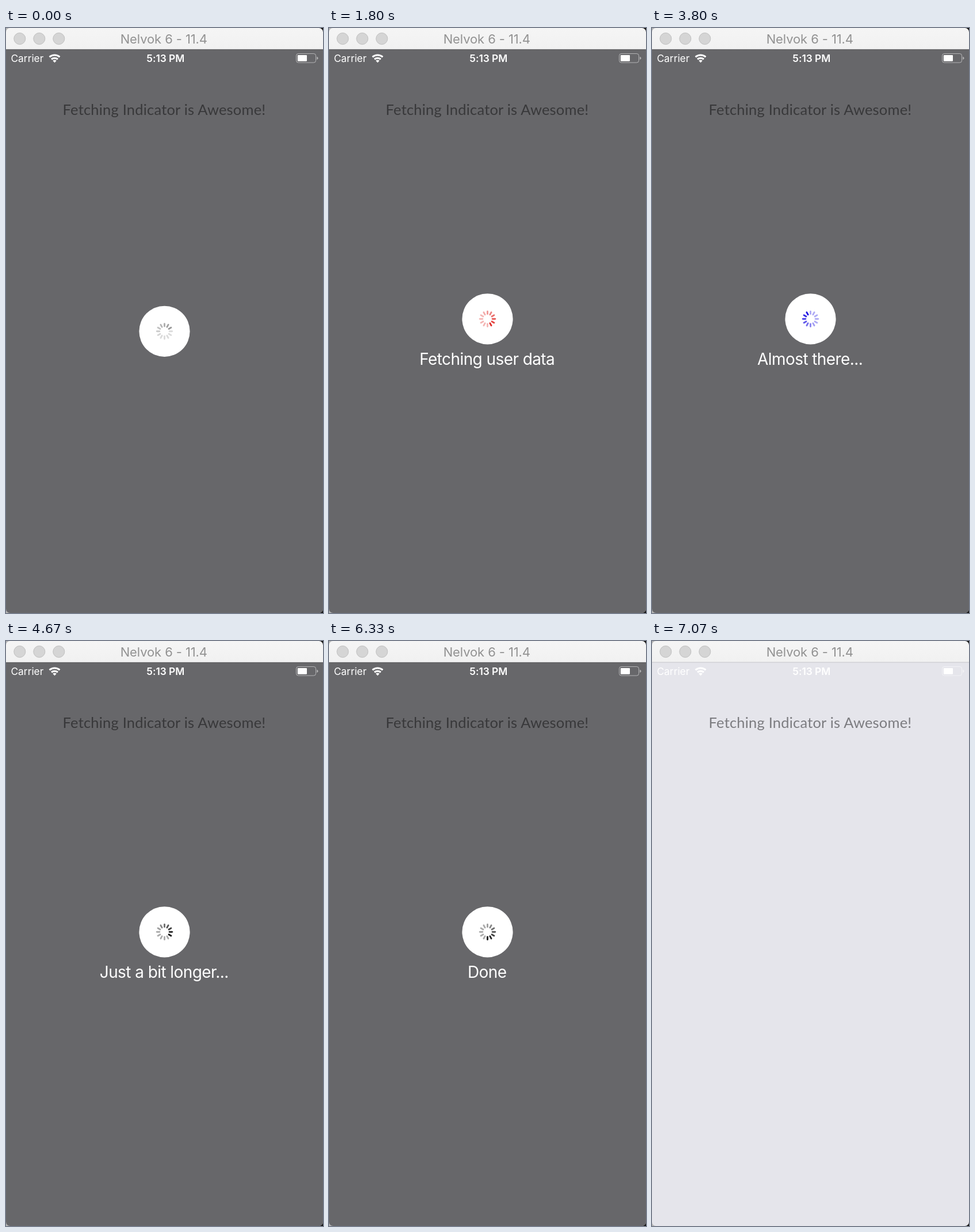
Animation of 551 by 1016 pixels, one loop 7740 ms. Source, as an HTML page:

```html
<!DOCTYPE html>
<html lang="en">
<head>
<meta charset="utf-8">
<title>Loading indicator</title>
<style>
  html, body { margin: 0; width: 100%; height: 100%; overflow: hidden; background: #fff; }
  svg { display: block; width: 551px; height: 1016px; }
  text { font-family: Inter, "Open Sans", sans-serif; }
  .mid { text-anchor: middle; }
  .bar { font-size: 22px; letter-spacing: -.1px; fill: #929292; }
  .head { font-family: Lato, sans-serif; font-size: 25.5px; letter-spacing: .2px; fill: #7c7c80; }
  .status { font-size: 17.4px; fill: #fff; }
  .bold { font-weight: 600; letter-spacing: -.05px; }
  .note { font-size: 28px; letter-spacing: -.58px; fill: #fff; }
</style>
</head>
<body>
<svg viewBox="0 0 551 1016">
  <defs>
    <clipPath id="win"><rect width="551" height="1016" rx="7"/></clipPath>
    <linearGradient id="chrome" x2="0" y2="1">
      <stop stop-color="#f5f5f5"/><stop offset="1" stop-color="#f1f1f1"/>
    </linearGradient>
  </defs>
  <rect width="275" height="1016" fill="#b5b5b5"/>
  <rect x="275" width="276" height="1016" fill="#111"/>
  <g clip-path="url(#win)">
    <rect width="551" height="37" fill="url(#chrome)"/>
    <g fill="#d5d5d5" stroke="#bfbfbf">
      <circle cx="23.8" cy="18.5" r="10"/>
      <circle cx="57.8" cy="18.5" r="10"/>
      <circle cx="91.8" cy="18.5" r="10"/>
    </g>
    <text class="bar mid" x="274.3" y="27">Nelvok 6 - 11.4</text>

    <rect y="37" width="551" height="979" fill="#e5e5eb"/>
    <rect y="36.5" width="551" height="1" fill="#c5c5c9"/>
    <text class="head mid" x="275" y="150.7">Fetching Indicator is Awesome!</text>
    <rect id="shade" y="37" width="551" height="979" fill="#000" opacity=".55"/>

    <text class="status" x="8.4" y="59">Carrier</text>
    <text class="status bold mid" x="277.3" y="59">5:13 PM</text>
    <g fill="none" stroke="#fff" stroke-width="3.1">
      <path d="M75.6 50.3a13.6 13.6 0 0 1 17.8 0"/>
      <path d="M79 54.3a8.5 8.5 0 0 1 11 0"/>
    </g>
    <path d="M84.5 60.2l-3.2-3.4a5 5 0 0 1 6.4 0z" fill="#fff"/>
    <rect x="504.5" y="44.5" width="34" height="15.6" rx="3.6" fill="none" stroke="#fff" stroke-opacity=".5"/>
    <path d="M540.2 49.8q2.4 .8 2.4 2.6t-2.4 2.6z" fill="#fff" fill-opacity=".5"/>
    <rect x="506.8" y="46.9" width="16.2" height="10.9" rx="1.2" fill="#fff"/>

    <g id="loader">
      <circle r="44.1" fill="#fff"/>
      <g id="blades" stroke-width="2.9" stroke-linecap="round"></g>
    </g>
    <text id="note" class="note mid" x="274.7" y="585"></text>
  </g>
</svg>
<script>
const LOOP = 7740, END = 7070, COUNT = 12, TURN = 1000;
const FADE = .1, REST = .35;
const stages = [
  { at: -450, color: "#999", y: 526.8, note: "" },
  { at: 1070, color: "#e2332f", y: 505.3, note: "Fetching user data" },
  { at: 2600, color: "#1d12e2", y: 505.3, note: "Almost there..." },
  { at: 4070, color: "#111", y: 505.3, note: "Just a bit longer..." },
  { at: 5530, color: "#111", y: 505.3, note: "Done" }
];

const byId = id => document.getElementById(id);
const shade = byId("shade"), loader = byId("loader"), blades = byId("blades"), note = byId("note");

const spokes = Array.from({ length: COUNT }, (_, i) => {
  const line = document.createElementNS("http://www.w3.org/2000/svg", "line");
  line.setAttribute("y1", -8.7);
  line.setAttribute("y2", -13.2);
  line.setAttribute("transform", `rotate(${i * 360 / COUNT})`);
  return blades.appendChild(line);
});

function draw(t) {
  const busy = t < END;
  for (const el of [shade, loader, note]) el.setAttribute("visibility", busy ? "visible" : "hidden");
  if (!busy) return;

  const stage = stages.filter(s => s.at <= t).pop();
  loader.setAttribute("transform", `translate(275.5 ${stage.y})`);
  blades.setAttribute("stroke", stage.color);
  if (note.textContent !== stage.note) note.textContent = stage.note;

  // Each stage restarts the spinner with its leading spoke at nine o'clock.
  const lead = 9 + Math.floor((t - stage.at) / TURN * COUNT);
  spokes.forEach((line, i) => {
    const lag = (lead - i + COUNT) % COUNT;
    line.setAttribute("opacity", Math.max(REST, 1 - lag * FADE));
  });
}

const start = performance.now();
function tick() {
  draw((performance.now() - start) % LOOP);
  requestAnimationFrame(tick);
}
tick();
</script>
</body>
</html>
```
